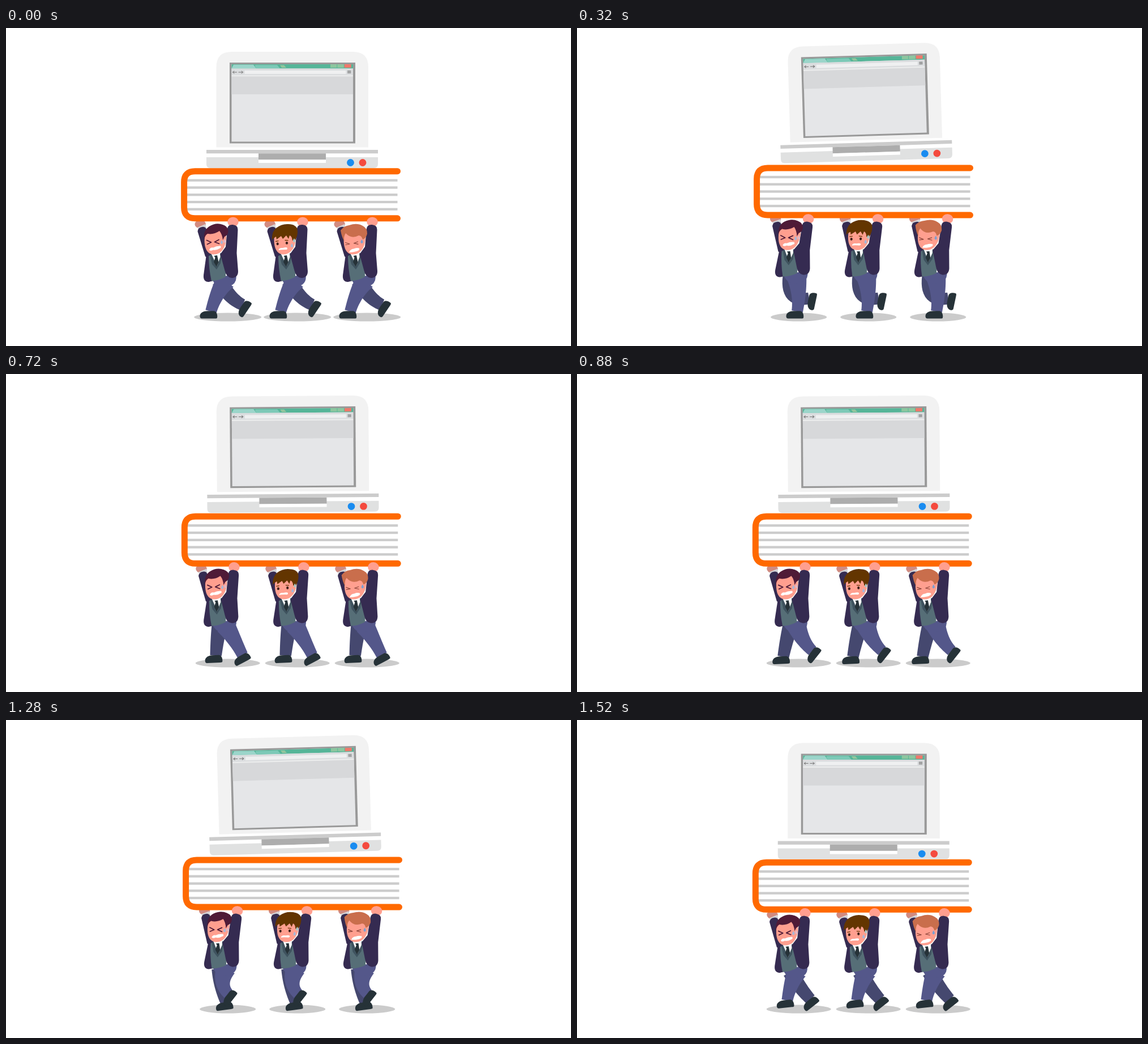
An HTML page for the animation above (1.6 s loop, 998 by 561 pixels).

```html
<!DOCTYPE html>
<html lang="en">
<head>
<meta charset="utf-8">
<title>Heavy load</title>
<style>
  html, body { margin: 0; width: 100%; height: 100%; overflow: hidden; background: #fff; }
  svg { display: block; width: 100%; height: 100%; }
</style>
</head>
<body>
<svg id="stage" viewBox="0 0 998 561" xmlns="http://www.w3.org/2000/svg"></svg>
<script>
const LOOP = 1600, TICK = 80, GAP = 123;
const SUIT = '#352b51', SKIN = '#ff9f8f', NEAR = '#54578a', FAR = '#45486f', SHOE = '#263238';

// Rows: time, shoe x, shoe y, shoe angle, knee x, knee y
const nearKeys = [
  [0, 358, 506, 0, 371, 468],
  [320, 385, 506, 0, 394, 470],
  [560, 402, 504, -14, 398, 468],
  [720, 417, 503, -28, 404, 468],
  [800, 423, 497, -50, 404, 470],
  [1040, 408, 492, -54, 386, 476],
  [1280, 395, 490, -52, 376, 466],
  [1520, 368, 501, -6, 376, 468]
];
const farKeys = [
  [0, 421, 495, -56, 396, 479],
  [320, 415, 482, -78, 370, 484],
  [560, 396, 503, -20, 371, 472],
  [720, 367, 503, -3, 373, 468],
  [800, 358, 506, 0, 368, 468],
  [1040, 366, 503, -8, 374, 470],
  [1280, 386, 505, -8, 378, 470],
  [1520, 413, 500, -38, 394, 474]
];

const path = (d, fill) => `<path d="${d}" fill="${fill}"/>`;
const rect = (x, y, w, h, fill, r = 0) =>
  `<rect x="${x}" y="${y}" width="${w}" height="${h}" rx="${r}" fill="${fill}"/>`;
const oval = (x, y, rx, ry, fill) => `<ellipse cx="${x}" cy="${y}" rx="${rx}" ry="${ry}" fill="${fill}"/>`;
const line = (d, color, w) =>
  `<path d="${d}" fill="none" stroke="${color}" stroke-width="${w}" stroke-linecap="round" stroke-linejoin="round"/>`;
const drop = (x, y, fill = '#a9b7d6') =>
  path(`M${x} ${y - 4}q3 4 1.8 6q-1.8 2-3.6 0q-1.2-2 1.8-6Z`, fill);

function laptop() {
  const screen =
    rect(395, 61, 222, 142.5, '#999') +
    rect(398.5, 64, 214.5, 136.5, '#e5e6e8') +
    rect(398.5, 64, 214.5, 7.5, '#55b598') +
    path('M398.5 71.5L401.5 65.5Q402 64.8 403 64.8H437L442 71.5Z', '#9bd5ca') +
    path('M442 71.5L439.500 66.500Q440 65.300 442 65.300H479L484 71.5Z', '#7cc9b7') +
    path('M484 65.500H491L495 70H487Z', '#93c59d') +
    rect(573, 64, 11.300, 6, '#8dc69f') + rect(585.2, 64, 11.600, 6, '#8dc69f') +
    rect(597.7, 64, 12, 6, '#f0786b') +
    rect(398.5, 71.5, 214.5, 12, '#dbdddf') +
    rect(421.5, 75, 179, 6, '#eff0f1') +
    line('M407.500 78H400.500l2.500-2m-2.500 2l2.500 2M411 78H418.500l-2.500-2m2.500 2l-2.500 2', '#777', 1) +
    line('M603.500 75.700H609M603.500 77.500H609M603.500 79.300H609', '#777', 1) +
    rect(398.5, 83.5, 214.5, 2, '#eceded') +
    rect(398.5, 85.5, 214.5, 31.5, '#d7d8da');
  return path('M371.500 210.500V69Q371.500 42 398.500 42H613Q640 42 640 69V210.500Z', '#f2f2f2') + screen +
    rect(354, 215, 303, 6.3, '#ccc') +
    path('M354 228H657V240Q657 247 650 247H361Q354 247 354 240Z', '#e0e1e1') +
    rect(446, 221.3, 119, 11, '#adadad') + rect(446, 232.3, 119, 5.7, '#fff') +
    oval(608.5, 237.5, 6.4, 6.4, '#1a8cf0') + oval(630, 237.5, 6.4, 6.4, '#f44a3e');
}

function book() {
  let pages = rect(316, 254, 375.5, 81, '#fff');
  for (let i = 0; i < 5; i++) pages += rect(317, 266.6 + i * 12.75, 374.5, 4.3, '#ccc');
  return pages + line('M691.500 252.700H334Q314.600 252.700 314.600 272V316.500Q314.600 335.800 334 335.800H691.500', '#ff6900', 11);
}

const face = path('M351 366C349 386 354 398.500 366 399.500C380 400 389 387 389 368L380 355H356Z', SKIN);
const teeth = path('M359 391.500Q361 386.500 366 387.500Q372 384 379 384.500Q381 388 377 389Q372 392.500 366 391.500Q361 394 359 391.500Z', '#fff');

const heads = [
  face +
    path('M350 374Q348 357 359 350Q371 342.500 383 347Q392 350 392.500 358Q392 366 386 368L383 374Q382 364 377 358Q367 365 356 363Q351 366 350 374Z', '#4f1b37') +
    line('M354.500 374.500L362.500 378L355.500 381.500M376 373.500L368.500 377.500L376.500 380.500', '#4f1b37', 1.8) +
    teeth + drop(381, 378) + drop(386, 376, '#dfb7c5'),
  face +
    path('M347 374Q346 360 354 353Q364 345 376 346Q387 346 391 353Q394 363 388 374L383 375Q382 367 378 366L376 372L372 366L366 372L363 367L355 373L354 368Q349 371 347 374Z', '#633500') +
    oval(356.7, 380.8, 2.1, 2.5, '#40201a') + oval(373, 379.2, 2.1, 2.5, '#40201a') +
    line('M353.500 376.500L358 375.700M370 374.500L375 374.700', '#633500', 1.3) +
    path('M358.500 392Q359 387.500 366 388Q373 386 374 388.500Q374 391.500 370 391Q362 391 358.500 392Z', '#fff') +
    drop(386, 375, '#a9c7c8') + drop(382, 384),
  face +
    path('M345 357Q351 349 360 348Q374 343 384 349Q392.500 353 392 363Q390 371 384 373Q382 366 377 366Q364 373 354 362Q350 368 351.500 376Q347 369 345 357Z', '#c96e4c') +
    line('M353.500 378.500L361 381L354 382.500M375.500 377L368.500 379.700L376 381.300', '#8c443a', 1.2) +
    path('M360 396Q362 390 368 389.500Q373 387 378 388.500Q379.500 392 373 394Q366 396 360 396Z', '#fff') +
    drop(382.5, 377, '#7f9fd0')
];

const backArm =
  oval(343.2, 346, 9.8, 7.6, '#d18b81') +
  path('M338 352L352 346L354 353L341 358Z', '#d5d5d8') +
  path('M338.500 359Q339 352 346 351Q352 350 354 355L364 388L360 408L352 403Z', SUIT);

const torso =
  path('M364 442L406 434Q409 447 400 453Q388 459 376 456Q367 452 364 442Z', NEAR) +
  path('M355 392L349 436Q348 448 358 448L366 446L364 400Z', SUIT) +
  path('M358 402L380 397L388 420V439Q376 446 363 446.500Q358 424 358 402Z', '#566e77') +
  path('M360 400L364 417L372 426L379 415L381 399Z', '#3f535f') +
  path('M363 399L378 397L378.500 404L372.500 420Z', '#fff') +
  path('M367.500 402L373 401L375.500 413L372 421L367 413L369.500 405Z', SHOE) +
  oval(401, 342, 9.8, 8.6, SKIN) +
  path('M391 354Q392 346.500 400.500 347Q410 348 409.500 356L407.500 397L410 429Q410 440.500 399 441Q389 440 386.500 428L378.500 399L388 386Z', SUIT);

const shoePath = path('M-15.500 2.500C-15.500-4-9-6.800-2-6.800H9C14-6.500 16 0 15 5Q15 6.500 11 6.500H-12Q-15.500 6.500-15.500 2.500Z', SHOE);

const groups = ['shadow', 'far', 'back', 'book', 'laptop', 'near', 'front'];
const each = make => [0, 1, 2].map(i => `<g transform="translate(${i * GAP})">${make(i)}</g>`).join('');
const leg = color => `<path class="limb" fill="${color}"/><g class="shoe">${shoePath}</g>`;
const parts = {
  shadow: each(() => oval(391.7, 510, 59.5, 7.5, '#cbcbcb')),
  far: each(() => leg(FAR)),
  back: each(() => `<g class="body">${backArm}</g>`),
  book: book(),
  laptop: laptop(),
  near: each(() => leg(NEAR)),
  front: each(i => `<g class="body">${torso}${heads[i]}</g>`)
};
const stage = document.getElementById('stage');
stage.innerHTML = groups.map(id => `<g id="${id}">${parts[id]}</g>`).join('');
const all = q => [...stage.querySelectorAll(q)];
const nodes = {
  shadows: all('#shadow ellipse'), bodies: all('.body'),
  book: all('#book')[0], laptop: all('#laptop')[0],
  near: [all('#near .limb'), all('#near .shoe')],
  far: [all('#far .limb'), all('#far .shoe')]
};
const put = (list, name, value) => list.forEach(n => n.setAttribute(name, value));

function pose(keys, t) {
  let i = keys.length - 1;
  while (keys[i][0] > t) i--;
  const a = keys[i], b = keys[(i + 1) % keys.length];
  const u = (t - a[0]) / ((b[0] || LOOP) - a[0]);
  return a.map((v, n) => v + (b[n] - v) * u).slice(1);
}

// Tapered limb along a quadratic curve
function limb(h, k, a, width) {
  const left = [], right = [], N = 14;
  for (let i = 0; i <= N; i++) {
    const u = i / N, v = 1 - u;
    const at = n => v * v * h[n] + 2 * u * v * k[n] + u * u * a[n];
    const dir = n => v * (k[n] - h[n]) + u * (a[n] - k[n]);
    const x = at(0), y = at(1), dx = dir(0), dy = dir(1);
    const s = width(u) / (Math.hypot(dx, dy) || 1);
    left.push(`${(x - dy * s).toFixed(2)} ${(y + dx * s).toFixed(2)}`);
    right.unshift(`${(x + dy * s).toFixed(2)} ${(y - dx * s).toFixed(2)}`);
  }
  return 'M' + left.concat(right).join('L') + 'Z';
}

function drawLeg([limbs, shoes], keys, t, hip, width) {
  const [x, y, turn, kx, ky] = pose(keys, t);
  const r = turn * Math.PI / 180, c = Math.cos(r), s = Math.sin(r);
  const ankle = [x + 4 * c + 6 * s, y + 4 * s - 6 * c];
  put(limbs, 'd', limb(hip, [kx, ky], ankle, width));
  put(shoes, 'transform', `translate(${x} ${y}) rotate(${turn})`);
}

function draw(t) {
  const lift = 1 - Math.abs(1 - (t % 800) / 400);
  // The second fall of the laptop settles a little early
  const tilt = t > 1200 ? Math.max(0, (1520 - t) / 320) : lift;
  const shift = `translate(${3.75 * lift} ${-7.2 * lift})`;
  nodes.book.setAttribute('transform', shift);
  nodes.laptop.setAttribute('transform', `${shift} rotate(${-2.1 * tilt} 268 135)`);
  put(nodes.bodies, 'transform', `translate(${lift} ${-8.5 * lift}) rotate(${5 * lift} 382 440)`);
  put(nodes.shadows, 'rx', 59.5 - 12.5 * lift);
  const hipY = 446 - 8 * lift;
  drawLeg(nodes.far, farKeys, t, [377, hipY], u => 10.2 + 3.5 * (1 - u));
  drawLeg(nodes.near, nearKeys, t, [388, hipY], u => 10 + 7.5 * Math.pow(1 - u, 1.5));
}

function loop() {
  draw(Math.floor((performance.now() % LOOP) / TICK) * TICK);
  requestAnimationFrame(loop);
}
loop();
</script>
</body>
</html>
```
